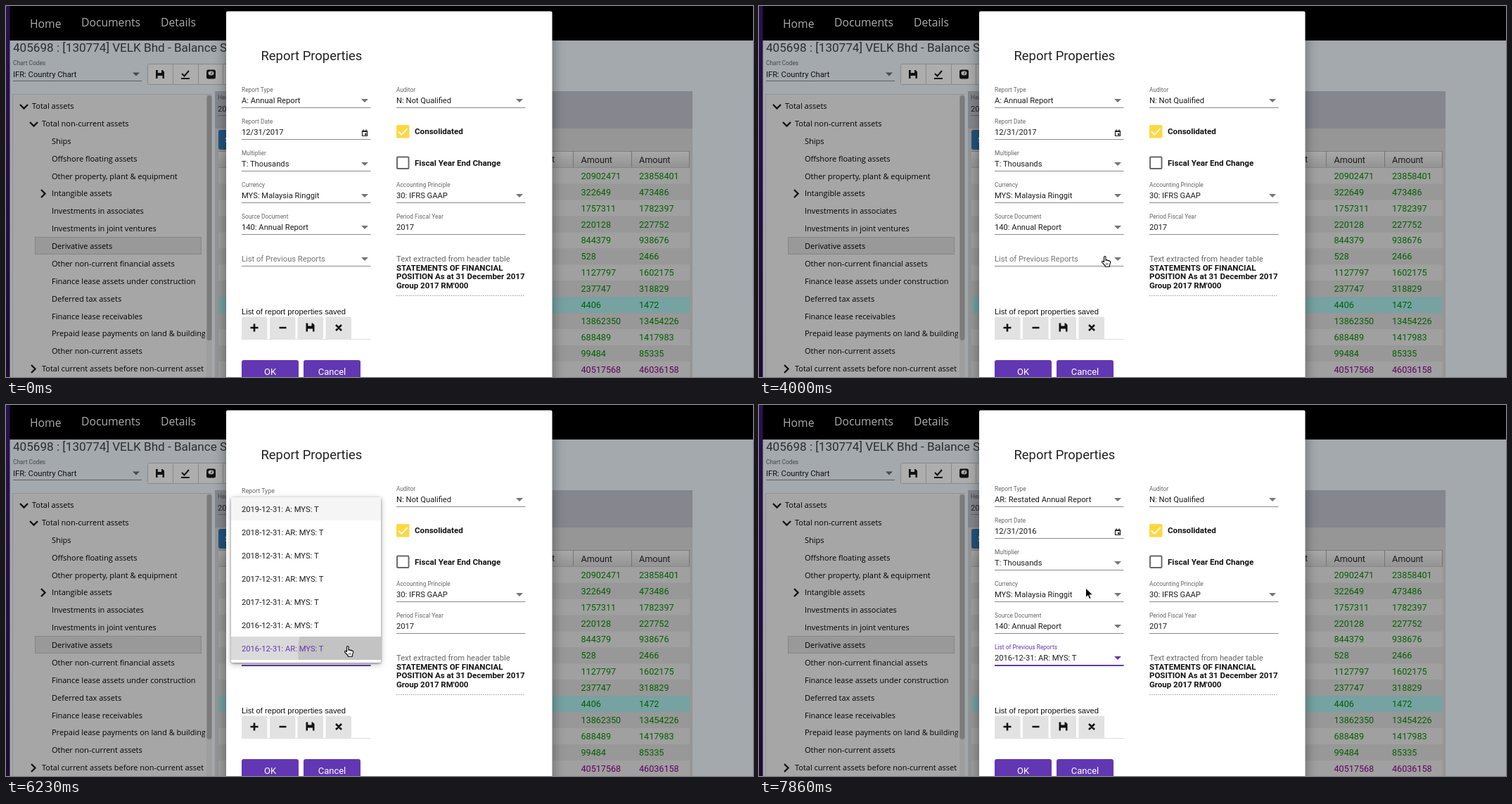
An HTML page that plays this animation: 1062x527 px, repeating every 8000 ms.

```html
<!DOCTYPE html>
<html lang="en">
<head>
<meta charset="utf-8">
<style>
html, body { margin: 0; width: 100%; height: 100%; overflow: hidden; background: #a3a9ad }
svg { display: block; width: 1062px; height: 527px; font-family: Roboto, sans-serif }
text { white-space: pre }
.open { font-family: "Open Sans", sans-serif }
.sans { font-family: "Liberation Sans", sans-serif }
.modal { filter: drop-shadow(0 6px 9px #0006) }
.panel { filter: drop-shadow(0 1.5px 1.5px #0006) drop-shadow(0 2px 4px #0004) }
</style>
</head>
<body>
<svg id="stage" viewBox="0 0 1062 527"></svg>
<script>
const PURPLE = '#6237b3', GREY = '#757575', INK = '#1c1c1c', DIM = '#adadad';

const rect = (x, y, w, h, fill, more = '') =>
  `<rect x="${x}" y="${y}" width="${w}" height="${h}" fill="${fill}" ${more}/>`;
const text = (x, y, s, size = 11.2, fill = INK, more = '') =>
  `<text x="${x}" y="${y}" font-size="${size}" fill="${fill}" ${more}>${s.replace(/&/g, '&amp;')}</text>`;
const path = (d, stroke, width = 1, more = '') =>
  `<path d="${d}" fill="none" stroke="${stroke}" stroke-width="${width}" ${more}/>`;
const shape = (d, fill, more = '') => `<path d="${d}" fill="${fill}" fill-rule="evenodd" ${more}/>`;
const group = (id, body, more = '') => `<g id="${id}" ${more}>${body}</g>`;
const at = (x, y) => `transform="translate(${x} ${y})"`;
const arrow = (x, y, fill = GREY) => shape(`M${x - 5} ${y}h10l-5 5z`, fill);
const floppy = (x, y) => shape(
  'M-6-6h9.5l2.5 2.5v9.5h-12zM-3.2-6v4h5.2v-4zM-3.5 2v4h7v-4z', '#111', at(x, y));

function page() {
  let s = rect(0, 0, 1062, 527, '#a3a9ad') + rect(0, 0, 1062, 49, '#000') +
    rect(0, 0, 5.5, 527, 'url(#edge)');
  [['Home', 34, 31], ['Documents', 107, 29], ['Details', 220, 29]].forEach(([label, x, y]) =>
    s += text(x, y, label, 15.7, DIM, 'class="open"'));
  s += text(10, 64.5, '405698 : [130774] VELK Bhd - Balance S', 17.1, '#2c2e30') +
    text(10, 84, 'Chart Codes', 8.4, '#454749') + text(10, 101, 'IFR: Country Chart', 11.2, '#111') +
    path('M10 106.5H193', '#5c5f62') + arrow(185, 94.5, '#494b4d');

  // toolbar
  s += rect(201.5, 82.5, 130, 29, DIM, 'stroke="#898989" rx="2"') +
    path('M237.5 83v28M273.5 83v28M308.5 83v28', '#898989') + floppy(219, 97) +
    path('M250 96l3.5 3.5 6.5-7.5M249 103h12', '#111', 2) +
    rect(285, 90.5, 13, 13, '#111', 'rx="2.5"') +
    `<ellipse cx="291.5" cy="95.5" rx="4" ry="3" fill="${DIM}"/>` + path('M291.5 97l1.5-3', '#111');
  return s + tree() + table();
}

function tree() {
  let s = rect(9.5, 125.5, 283, 410, '#a6a6a6', 'stroke="#909294"') +
    rect(285, 126, 8, 401, '#9e9e9e') + rect(285.5, 127, 7, 348, '#7b7b7b', 'rx="3.5"') +
    rect(41.5, 328.5, 236, 24, '#999', 'stroke="#868686"');
  const items = ['Total assets', 'Total non-current assets', 'Ships', 'Offshore floating assets',
    'Other property, plant & equipment', 'Intangible assets', 'Investments in associates',
    'Investments in joint ventures', 'Derivative assets', 'Other non-current financial assets',
    'Finance lease assets under construction', 'Deferred tax assets', 'Finance lease receivables',
    'Prepaid lease payments on land & building', 'Other non-current assets',
    'Total current assets before non-current asset'];
  const labels = items.map((label, i) => {
    const x = i == 0 ? 37 : i == 1 || i == 15 ? 51 : 65;
    return text(x, 146 + i * 24.88, label, 11, '#000', 'class="open"');
  }).join('');
  return s + `<g clip-path="url(#treeClip)">${labels}</g>` +
    path('M20 140l5.5 5.5 5.5-5.5M34 165l5.5 5.5 5.5-5.5M50 261l5.5 5.5-5.5 5.5M36 510l5.5 5.5-5.5 5.5',
      '#111', 2.3);
}

function table() {
  let s = rect(297, 121, 679, 406, '#969696') + rect(297, 121, 679, 53, '#86868f') +
    text(301, 133, 'Header', 8.4, '#44444a') + text(301, 150, '2017', 11.2, '#222') +
    path('M301 155.5h30', '#666') + rect(302, 176, 60, 28, '#23537c', 'rx="3"') +
    text(311, 194, 'Save', 11, DIM) +
    rect(302, 206, 670, 23, 'url(#head)') + path('M302 206.5h670M302 229.5h670', '#808080') +
    path('M806.5 206v23M889.5 206v23M971.5 206v23', '#747474') +
    text(776, 222, 't', 12.6) + text(817.5, 222.5, 'Amount', 12.6) + text(900, 222.5, 'Amount', 12.6);
  const amounts = [20902471, 23858401, 322649, 473486, 1757311, 1782397, 220128, 227752, 844379, 938676,
    528, 2466, 1127797, 1602175, 237747, 318829, 4406, 1472, 13862350, 13454226, 688489, 1417983,
    99484, 85335, 40517568, 46036158];
  for (let i = 0; i < 13; i++) {
    const y = 229.8 + i * 22.92, ink = i == 12 ? '#600060' : '#006000';
    s += rect(302, y, 670, 23, i == 8 ? '#77a2a2' : i % 2 ? '#989898' : '#a0a0a0') +
      text(817.5, y + 16, '' + amounts[2 * i], 12.6, ink) +
      text(900, y + 16, '' + amounts[2 * i + 1], 12.6, ink);
  }
  return s;
}

function field(x, y, label, value, id) {
  return text(x, y - 23, label, 8.4, '#666', id ? `id="${id}Label"` : '') +
    text(x, y - 7, value, 11.2, INK, id ? `id="${id}"` : '') + path(`M${x} ${y - .5}h183.5`, '#8a8a8a');
}

function dialog() {
  let s = rect(313, 7.5, 463.5, 540, '#fff', 'class="modal" rx="2"') +
    text(362.5, 77, 'Report Properties', 18.4, '#222') +
    field(335, 145, 'Report Type', '', 'type') + field(335, 190, 'Report Date', '', 'date') +
    field(335, 235, 'Multiplier', '', 'mult') + field(335, 280, 'Currency', 'MYS: Malaysia Ringgit') +
    field(335, 325, 'Source Document', '140: Annual Report') +
    field(335, 370, 'List of Previous Reports', '', 'list') +
    field(555, 145, 'Auditor', 'N: Not Qualified') + field(555, 280, 'Accounting Principle', '30: IFRS GAAP') +
    field(555, 325, 'Period Fiscal Year', '2017');
  [132, 222, 267, 312].forEach(y => s += arrow(510, y));
  s += arrow(730, 132) + arrow(730, 267) + group('listArrow', arrow(510, 357, 'currentColor')) +
    rect(335, 369, 183.5, 2, PURPLE, 'id="focus"') +
    path('M506.5 177.5h7v7h-7zM506 178.5h8M508 177v-1.8M512 177v-1.8', '#222', 1.2) + rect(510, 181, 2.5, 2.5, '#222');

  // check boxes
  s += rect(555, 169, 18.5, 18.5, '#ffd740', 'rx="1.5"') + path('M558 178.5l4.3 4.3 8.2-8.6', '#fff', 1.9) +
    rect(556, 214.5, 16.5, 16.5, '#fff', 'stroke="#666" stroke-width="1.9" rx="1"');
  [['Consolidated', 182], ['Fiscal Year End Change', 227]].forEach(([label, y]) =>
    s += text(581, y, label, 11.6, '#111', 'font-weight="700"'));

  s += text(555, 363, 'Text extracted from header table', 11.2, '#666');
  ['STATEMENTS OF FINANCIAL', 'POSITION As at 31 December 2017', "Group 2017 RM'000"].forEach((line, i) =>
    s += text(555, 376 + i * 12.4, line, 11.5, '#111', 'font-weight="700"'));
  s += path('M555 411.5h183', '#999', 1, 'stroke-dasharray="1.5 1.5"') +
    text(335, 437.5, 'List of report properties saved', 11.2, '#111', 'class="sans"') +
    path('M335 473.5h183.5', '#ddd');

  // buttons
  [335, 375, 414.5, 454.5].forEach(x => s += rect(x, 441.5, 36.5, 32, '#e2e2e2', 'rx="2"'));
  s += path('M347.5 457h11M353 451.5v11M388.5 457h10M469 453l8 8M477 453l-8 8', '#111', 2.6) + floppy(432.5, 456.5) +
    rect(335, 503, 81, 34, PURPLE, 'rx="3"') + rect(423, 503, 81, 34, PURPLE, 'rx="3"') +
    text(375.5, 524, 'OK', 13, '#fff', 'text-anchor="middle"') +
    text(463.5, 524, 'Cancel', 13, '#fff', 'text-anchor="middle"');
  return s;
}

function options() {
  const rows = ['2019-12-31: A', '2018-12-31: AR', '2018-12-31: A', '2017-12-31: AR', '2017-12-31: A',
    '2016-12-31: A', '2016-12-31: AR'];
  return rect(320, 131, 213, 235, '#fff', 'class="panel" rx="2"') + rect(320, 131, 213, 33, '#f5f5f5') +
    rect(320, 329, 213, 33, '#f3f3f3') +
    group('ripple', rect(320, 329, 213, 33, '#dadada') +
      '<circle cx="488" cy="349" r="73" fill="#c3c3c3" clip-path="url(#rowClip)"/>') +
    rows.map((s, i) => text(335, 151.5 + 33 * i, s + ': MYS: T', 11.2, INK, i == 6 ? 'id="picked"' : '')).join('') +
    rect(524.5, 132, 6.5, 65, '#9b9b9b', 'id="scroll" rx="3.2"');
}

const pointer = shape('M0 0V13.4l3.1-2.8 2.1 4.9 2.3-1-2.1-4.7H10z', '#000', 'stroke="#fff" stroke-width=".9"');
const hand = '<path d="M3.5 9V2q0-1.5 1.3-1.5T6 2v4.2q2-.8 2.4.4 1.7-.6 2.2.6 2-.3 2 1.4-.1 3-1.3 4.6v2H5.2v-1.4' +
  'L1 9.6Q0 8 1.2 7.4t2.3 1.6z" fill="#fff" stroke="#000" stroke-width="1.1"/>' +
  path('M6.8 10v2.8M8.8 10v2.8', '#000', .7);

const stage = document.getElementById('stage');
stage.innerHTML = `<defs>
  <linearGradient id="edge" x2="0" y2="1"><stop stop-color="#2a1150"/><stop offset="1" stop-color="#1a0a33"/></linearGradient>
  <linearGradient id="head" x2="0" y2="1"><stop stop-color="#a9a9a9"/><stop offset="1" stop-color="#949494"/></linearGradient>
  <clipPath id="treeClip"><rect x="10" y="126" width="273" height="401"/></clipPath>
  <clipPath id="rowClip"><rect x="320" y="329" width="213" height="33"/></clipPath></defs>` +
  page() + dialog() + group('options', options()) + group('pointer', pointer) + group('hand', hand);

const el = {};
stage.querySelectorAll('[id]').forEach(n => el[n.id] = n);
const set = (n, attrs) => { for (const k in attrs) n.setAttribute(k, attrs[k]); };
const show = (n, on) => n.style.display = on ? '' : 'none';

// start time, x, y of the mouse; a fourth value marks the hand
const moves = [[740, 962, 522], [890, 889.5, 523], [1180, 806, 480], [1330, 680, 418], [1480, 611.5, 382],
  [1780, 592, 350], [1930, 548, 275], [2080, 503, 205], [2220, 476, 158], [2370, 482, 142], [2510, 498, 135],
  [2800, 506.5, 147], [2950, 507, 172], [3100, 503, 215, 1], [3250, 500, 272, 1], [3400, 492, 326, 1],
  [3550, 486, 355, 1], [4000, 487, 355, 1], [4140, 488, 355, 1], [5340, 486, 351, 1], [5490, 483, 346, 1],
  [5630, 481, 342, 1], [7120, 452, 300], [7270, 392, 238], [7420, 354, 198], [7570, 360, 187], [7860, 464.5, 260]];

function draw(t) {
  const [, x, y, isHand] = moves.filter(m => m[0] <= t).pop() || [0, -50, -50];
  show(el.pointer, !isHand);
  show(el.hand, isHand);
  set(isHand ? el.hand : el.pointer, { transform: `translate(${x} ${y})` });

  const opened = t >= 4740, picked = t >= 6230, chosen = t >= 6380, filled = t >= 6680;
  const sinking = picked && !chosen;  // the emptied field's label starts to drop
  el.type.textContent = chosen ? 'AR: Restated Annual Report' : picked ? '' : 'A: Annual Report';
  set(el.typeLabel, sinking ? { y: 124.5, 'font-size': 8.8 } : { y: 122, 'font-size': 8.4 });
  el.date.textContent = chosen ? '12/31/2016' : '12/31/2017';
  el.mult.textContent = chosen && !filled ? '' : 'T: Thousands';
  set(el.multLabel, chosen && !filled ? { y: 228, 'font-size': 11.2 } : { y: 212, 'font-size': 8.4 });
  el.list.textContent = chosen ? '2016-12-31: AR: MYS: T' : '';
  set(el.listLabel, opened ? { y: 347, 'font-size': 8.4, fill: PURPLE } : { y: 363, 'font-size': 11.2, fill: GREY });
  el.listArrow.style.color = opened ? PURPLE : GREY;

  const opening = t < 4890;
  show(el.focus, opened);
  set(el.focus, opening ? { x: 339.5, width: 175 } : { x: 335, width: 183.5 });
  show(el.options, opened && !filled);
  set(el.options, {
    transform: `translate(0 366) scale(1 ${opening ? .979 : 1}) translate(0 -366)`,
    opacity: t < 6380 ? 1 : t < 6530 ? .6 : .12
  });
  show(el.ripple, picked);
  set(el.picked, { fill: picked ? PURPLE : INK });
  set(el.scroll, { opacity: t < 5340 ? 1 : t < 5490 ? .6 : t < 5630 ? .25 : 0 });
}

const start = performance.now();
(function tick() {
  draw((performance.now() - start) % 8000);
  requestAnimationFrame(tick);
})();
</script>
</body>
</html>
```
